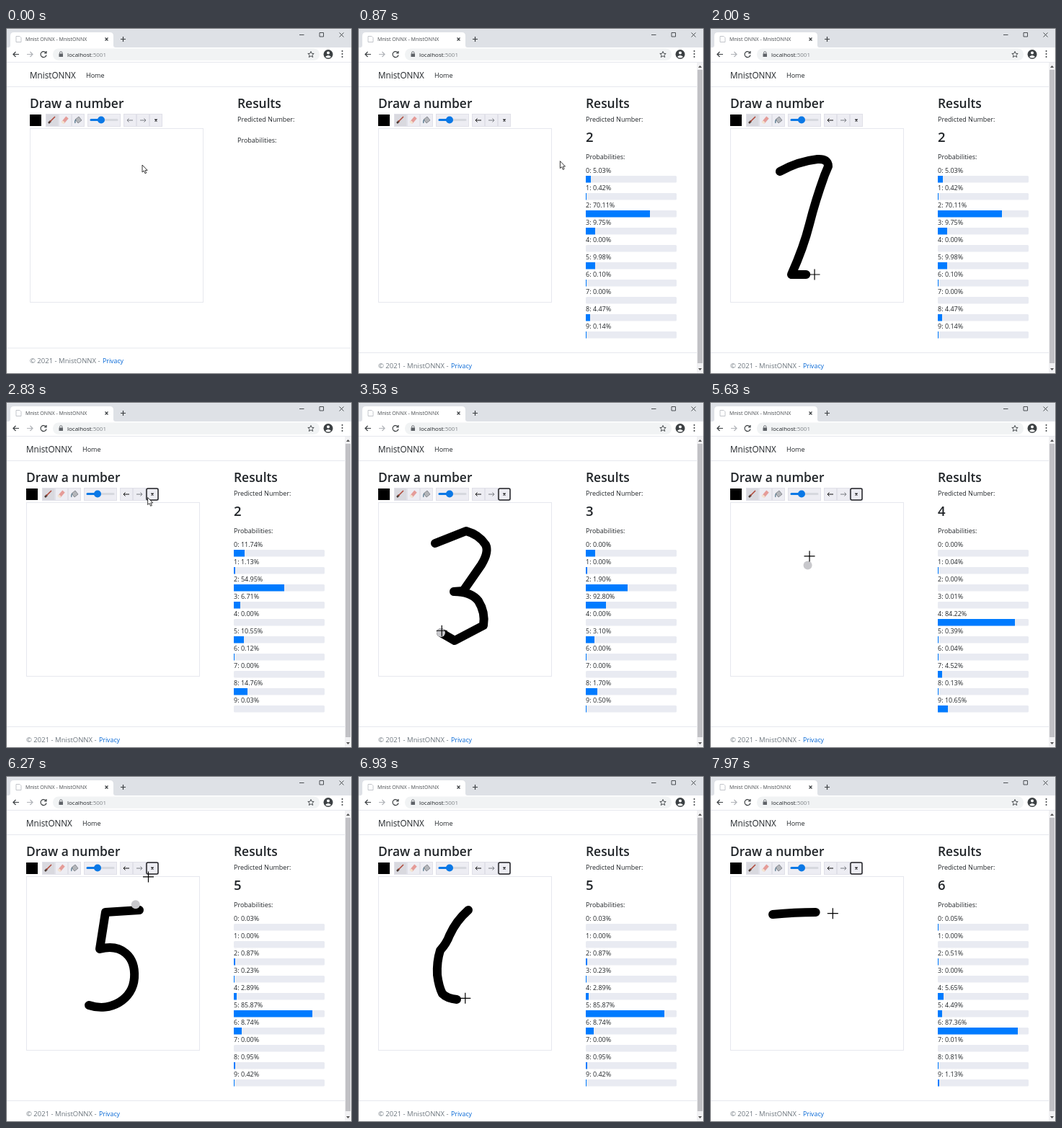
Animation of 480 by 480 pixels, one loop 8 s. Source, as an HTML page:

```html
<!DOCTYPE html>
<html lang="en">
<head>
<meta charset="utf-8">
<title>MnistONNX</title>
<style>
html, body { margin: 0; width: 100%; height: 100%; overflow: hidden; background: #fff; }
svg { display: block; width: 100vw; height: 100vh; }
text { font: 9px "Open Sans", "Noto Sans", sans-serif; fill: #212529; white-space: pre; }
.h { font-size: 17.4px; font-weight: 600; }
.brand { font-size: 11.7px; }
.url { font-size: 8px; }
.tab { font-size: 7.1px; fill: #45494d; }
.btn { fill: #ededf3; stroke: #e0e0e8; }
.line { fill: none; stroke: #3c4043; stroke-width: 1.2; }
.thin { stroke-width: .9; }
.edge { fill: none; stroke: #e6e8ee; }
#ink path { fill: none; stroke: #000; stroke-width: 12; stroke-linecap: round; stroke-linejoin: round; }
</style>
</head>
<body>
<svg viewBox="0 0 480 480">
  <rect width="480" height="480" fill="#fff"/>
  <g id="page">
    <text class="brand" x="28" y="69.5">MnistONNX</text>
    <text x="106" y="68.5">Home</text>
    <text class="h" x="28" y="110.5">Draw a number</text>
    <text class="h" x="316" y="110.5">Results</text>
    <text x="316" y="130">Predicted Number:</text>
    <text id="probs" x="316" y="181.5">Probabilities:</text>
    <g id="results"><text id="digit" class="h" x="316" y="158" style="font-size:18.5px"></text></g>

    <rect x="28" y="120" width="16" height="16"/>
    <g id="buttons"></g>
    <path d="M54 132l3-3" stroke="#4a3a34" stroke-width="2.5"/>
    <path d="M56 130l7-7" stroke="#b04a3c" stroke-width="1.6"/>
    <path d="M74 131l6-7" stroke="#e59c98" stroke-width="4.5"/>
    <path d="M73 132l2-2.500" stroke="#f3e3d0" stroke-width="4"/>
    <path d="M91 127l5-4 4 5-5 4z" fill="#b4b6ba" stroke="#777a80" stroke-width=".8"/>
    <path d="M92 127q-2 2-1 5" fill="none" stroke="#58788c" stroke-width="1.300"/>
    <path d="M113 127.500h36" stroke="#d6d8de" stroke-width="3" stroke-linecap="round"/>
    <path d="M113 127.500h14" stroke="#0a78e6" stroke-width="3" stroke-linecap="round"/>
    <circle cx="127" cy="127.500" r="5" fill="#0a78e6"/>
    <path id="undo" d="M171 128h-8m2.500-2.500l-2.500 2.500 2.500 2.500" fill="none"/>
    <path d="M181 128h8m-2.500-2.500l2.500 2.500-2.500 2.500" fill="none" stroke="#777a80"/>
    <path d="M201.500 126.500l3 3m0-3l-3 3" stroke="#111" stroke-width="1.400"/>
    <rect id="ring" x="195" y="120" width="16" height="16" rx="2" fill="none" stroke="#202124" stroke-width="1.500"/>

    <rect class="edge" x="28.500" y="139.500" width="240" height="241"/>
    <g id="ink"></g>
  </g>
  <path class="edge" d="M0 81.500H480"/>
  <g id="foot">
    <path class="edge" d="M0 450.500H480"/>
    <g id="footText">
      <text x="28" y="471.500" style="font-size:9.5px;fill:#6c757d">© 2021 - MnistONNX -</text>
      <text x="129" y="471.500" style="font-size:8.8px;fill:#0366d6">Privacy</text>
    </g>
  </g>
  <g id="scroll">
    <rect x="470" y="48" width="9" height="432" fill="#f1f1f3"/>
    <rect x="471" y="58" width="7" height="407" fill="#c1c1c5"/>
    <path d="M472 55l2.500-3 2.500 3zM472 472l2.500 3 2.500-3z" fill="#505050"/>
  </g>

  <rect width="480" height="27" fill="#dee1e6"/>
  <path d="M3 27q3 0 3-3V11q0-5 5-5H144q5 0 5 5V24q0 3 3 3z" fill="#fff"/>
  <path d="M14 11.500h5l2 2v6h-7z" fill="#fff" stroke="#b4b8be" stroke-width=".8"/>
  <text class="tab" x="27" y="18">Mnist ONNX - MnistONNX</text>
  <path class="line" d="M137.500 13.500l4 4m0-4l-4 4M162.500 12v7m-3.500-3.500h7"/>
  <path class="line thin" d="M407 9.500h6.500M435 6.500h5.500v5.500h-5.500zM462.500 6.500l6 6m0-6l-6 6"/>
  <rect y="27" width="480" height="20" fill="#fff"/>
  <rect x="65" y="28.500" width="370" height="16.500" rx="8" fill="#f1f3f4"/>
  <path class="line" d="M18 36.500h-8m3.500-3.500l-3.500 3.500 3.500 3.500"/>
  <path class="line" style="stroke:#b0b3b8" d="M29 36.500h8m-3.500-3.500l3.500 3.500-3.500 3.500"/>
  <path class="line" d="M55.500 34.500a4 4 0 1 0 .5 3M56 32v3h-3"/>
  <rect x="73.500" y="35.500" width="5.500" height="4.500" fill="#5f6368"/>
  <path class="line thin" style="stroke:#5f6368" d="M74.500 35.500v-1a1.700 1.700 0 0 1 3.500 0v1"/>
  <text class="url" x="85" y="39.500">localhost<tspan fill="#7d8186">:5001</tspan></text>
  <path class="line thin" d="M423 32.500l1.200 2.800 3 .2-2.300 2 .8 3-2.700-1.600-2.700 1.600.8-3-2.300-2 3-.2z"/>
  <circle cx="447" cy="36.500" r="6.500" fill="#3c4043"/>
  <circle cx="447" cy="34.500" r="2" fill="#fff"/>
  <path d="M443 40q4-4 8 0-4 3-8 0" fill="#fff"/>
  <path d="M466.500 32v10" stroke="#3c4043" stroke-width="2" stroke-linecap="round" stroke-dasharray="0 4"/>
  <path class="edge" d="M0 47.500H480"/>
  <rect x=".5" y=".5" width="479" height="479" fill="none" stroke="#6e7074"/>

  <circle id="brush" r="6" fill="#c8c8cc"/>
  <path id="cross" d="M-7.500 0H7.500M0-7.500V7.500" stroke="#000" stroke-width="1.200"/>
  <path id="arrow" d="M0 0v10l2.300-2 1.700 3.800 1.700-.8-1.600-3.600h3z" fill="#fff" stroke="#222" stroke-width=".9"/>
</svg>
<script>
const LOOP = 8000, LAG = 35, REST = 60, REPLY = 30, FADE = 120;
const CLEAR = [203, 128];
const $ = id => document.getElementById(id);
const set = (el, attrs) => { for (const k in attrs) el.setAttribute(k, attrs[k]); return el; };
const add = (parent, tag, attrs) =>
  parent.appendChild(set(document.createElementNS("http://www.w3.org/2000/svg", tag), attrs));
const show = (el, on) => set(el, { visibility: on ? "visible" : "hidden" });
const move = (el, x, y = 0) => set(el, { transform: `translate(${x} ${y})` });

for (const [x, w] of [[50, 17], [68, 17], [86, 17], [108, 45], [158, 17], [176, 17], [194, 17]])
  add($("buttons"), "rect", { class: "btn", x: x + .5, y: 119.5, width: w, height: 17 });
$("buttons").firstChild.style.fill = "#d9d9df";

// one entry per pen stroke: from, to, click on clear, path, reply in percent for 0 to 9
const strokes = [
  { from: 150, to: 380, clear: 720, d: "M148 186Q146 250 141 322",
    reply: [5.03, .42, 70.11, 9.75, 0, 9.98, .1, 0, 4.47, .14] },
  { from: 1220, to: 2118, clear: 2800, d: "M97 199Q122 185 149 182Q164 181 164 192L159 204Q146 240 138 272T113 342H185",
    reply: [11.74, 1.13, 54.95, 6.71, 0, 10.55, .12, 0, 14.76, .03] },
  { from: 2950, to: 3490, clear: 4110, d: "M107 196L150 179Q168 184 177 198Q182 208 171 226L146 262L133 263Q157 263 167 276Q177 292 174 310L134 331L115 320",
    reply: [0, 0, 1.9, 92.8, 0, 3.1, 0, 0, 1.7, .5] },
  { from: 4270, to: 4520, d: "M116 196Q113 228 114 262Q132 268 166 263Q180 261 192 262",
    reply: [.02, 0, .03, .03, 58.95, 15.85, .07, 6.34, .75, 17.96] },
  { from: 4760, to: 5000, clear: 5410, d: "M165 207Q166 260 161 322",
    reply: [0, .04, 0, .01, 84.22, .39, .04, 4.52, .13, 10.65] },
  { from: 5740, to: 6110, clear: 6340, d: "M185 186L138 189L130 240C160 232 180 250 178 280C176 310 145 328 115 318",
    reply: [.03, 0, .87, .23, 2.89, 85.87, 8.74, 0, .95, .42] },
  { from: 6460, to: 7200, clear: 7560, d: "M153 186Q136 201 127 221Q123 232 114 242Q109 258 110 276Q112 292 117 302Q124 309 138 310C160 309 172 295 167 278Q158 262 118 284",
    reply: [.05, 0, .51, 0, 5.65, 4.49, 87.36, .01, .81, 1.13] },
  { from: 7848, to: LOOP, d: "M87 192Q118 189 147 189L190 192" }
];

// cursor stops: rest at each stroke's ends and at the clear button, with a few detours
const stops = [
  [0, 189, 190], [30, 189, 190], [1000, 356, 240],
  [2260, 400, 250], [2380, 350, 62], [2500, 243, 128], [2600, ...CLEAR],
  [5150, 330, 250], [5300, 262, 160], [5560, 133, 240], [5630, 138, 214]
];
for (const s of strokes) {
  s.el = add($("ink"), "path", { d: s.d });
  s.len = s.el.getTotalLength();
  s.gone = (strokes.find(n => n.from >= s.from && n.clear) || {}).clear || Infinity;
  const [a, b] = [0, s.len].map(at => s.el.getPointAtLength(at));
  stops.push([s.from - REST, a.x, a.y], [s.from, a.x, a.y], [s.to, b.x, b.y]);
  if (s.clear) stops.push([s.clear - 40, ...CLEAR], [s.clear + 20, ...CLEAR]);
}
stops.sort((a, b) => a[0] - b[0]);

const drawing = t => strokes.find(s => t >= s.from && t < s.to);
const along = (s, t) => s.len * Math.min(1, (t - s.from) / (s.to - s.from));

function place(t) {
  const s = drawing(t);
  if (s) {
    const p = s.el.getPointAtLength(along(s, t));
    return [p.x, p.y];
  }
  const i = Math.max(1, stops.findIndex(p => p[0] > t));
  const [a, b] = [stops[i - 1], stops[i]];
  const u = Math.max(0, (t - a[0]) / (b[0] - a[0])), k = u * u * (3 - 2 * u);
  return [a[1] + (b[1] - a[1]) * k, a[2] + (b[2] - a[2]) * k];
}

const rows = Array.from({ length: 10 }, (_, i) => {
  const y = 205 + 24 * i, box = { x: 316, y, height: 9.5 };
  const label = add($("results"), "text", { x: 316, y: y - 4.2 });
  add($("results"), "rect", { ...box, width: 126, rx: 1.5, fill: "#e9ebf2" });
  return { label, bar: add($("results"), "rect", { ...box, fill: "#007bff" }) };
});

function drawResults(t) {
  const n = strokes.findLastIndex(s => s.reply && s.to + REPLY <= t), loaded = n >= 0;
  move($("page"), loaded ? 0 : 5);
  move($("foot"), 0, loaded ? 0 : -6.5);
  move($("footText"), loaded ? 0 : 5);
  set($("probs"), { y: loaded ? 181.5 : 158.5 });
  set($("undo"), { stroke: loaded ? "#111" : "#777a80" });
  show($("results"), loaded);
  show($("scroll"), loaded);
  if (!loaded) return;

  const { to, reply } = strokes[n];
  const k = 1 - (1 - Math.min(1, (t - to - REPLY) / FADE)) ** 2;
  $("digit").textContent = reply.indexOf(Math.max(...reply));
  rows.forEach(({ label, bar }, i) => {
    const old = n ? strokes[n - 1].reply[i] : 0;
    label.textContent = `${i}: ${reply[i].toFixed(2)}%`;
    set(bar, { width: Math.max(0, Math.ceil((old + (reply[i] - old) * k) * 1.26 - .04)) });
  });
}

function draw(t) {
  drawResults(t);
  show($("ring"), t >= strokes[1].clear);
  for (const s of strokes) {
    const on = t - LAG >= s.from && t < s.gone;
    show(s.el, on);
    if (on) set(s.el, { "stroke-dasharray": `${along(s, t - LAG)} 999` });
  }

  const [x, y] = place(t), [bx, by] = place(t - LAG);
  const inside = (px, py) => t > 60 && px > 28 && px < 269 && py > 139 && py < 381;
  const over = inside(x, y);
  move($("cross"), x, y);
  move($("arrow"), x, y);
  move($("brush"), bx, by);
  show($("cross"), over);
  show($("arrow"), !over);
  show($("brush"), over && inside(bx, by) && !drawing(t) && !drawing(t - LAG));
}

const start = performance.now();
(function tick() {
  draw((performance.now() - start) % LOOP);
  requestAnimationFrame(tick);
})();
</script>
</body>
</html>
```
